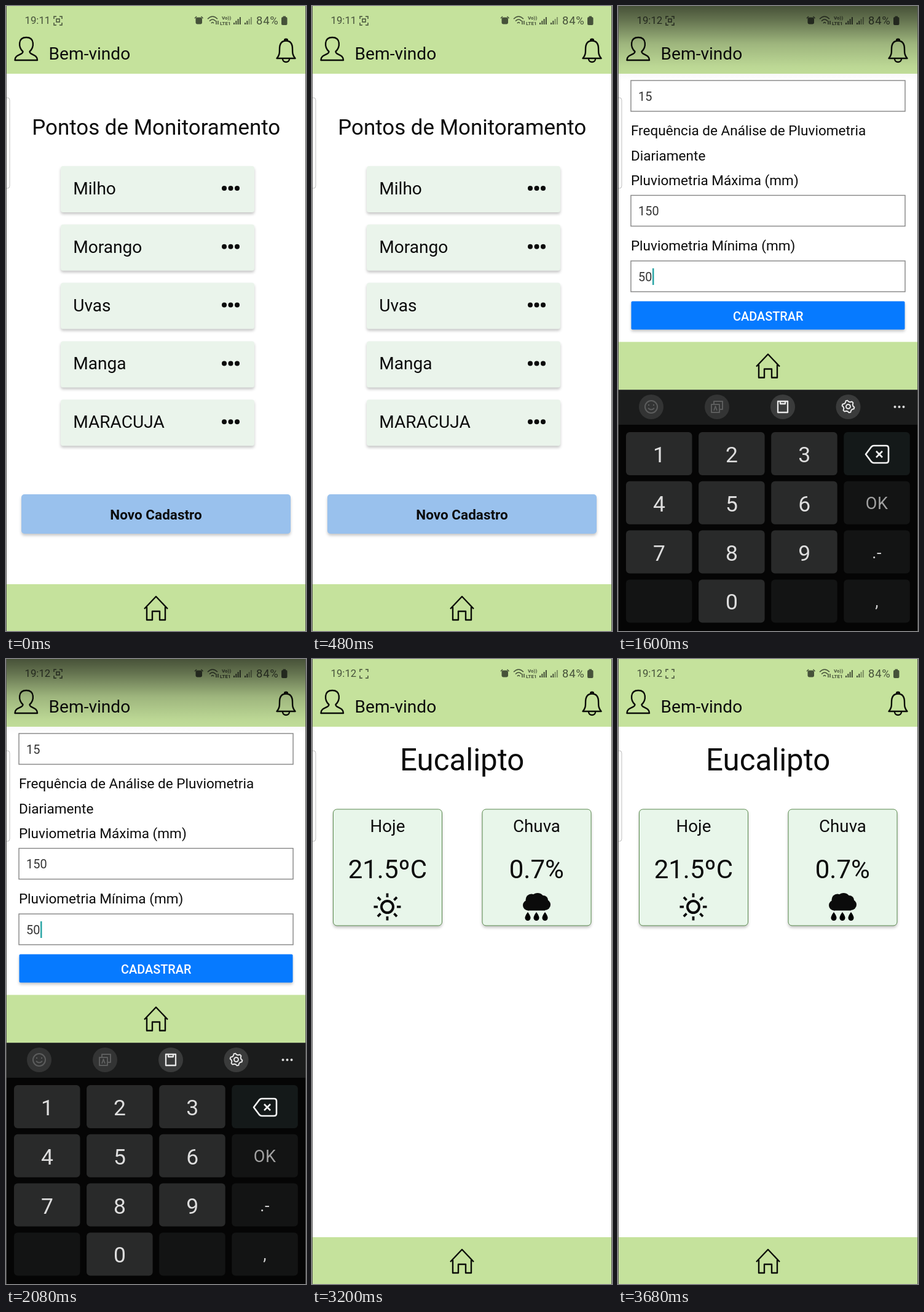
Animation of 488 by 1015 pixels, one loop 4 s. Source, as an HTML page:

```html
<!DOCTYPE html>
<html lang="pt">
<head>
<meta charset="utf-8">
<style>
html, body { margin: 0; width: 100%; height: 100%; overflow: hidden; background: #fff; }
svg { display: block; width: 488px; height: 1015px; font-family: Roboto, sans-serif; }
.card { filter: drop-shadow(0 3px 2px rgba(0,0,0,.22)); }
.dialog { filter: drop-shadow(0 8px 10px rgba(0,0,0,.5)); }
.line { fill: none; stroke: #0b0d08; stroke-width: 2.4; stroke-linejoin: round; }
</style>
</head>
<body>
<svg id="stage" viewBox="0 0 488 1015"></svg>
<script>
const GREEN = '#c5e29c';
const STEP = 800;

const rect = (x, y, w, h, fill, more = '') =>
  `<rect x="${x}" y="${y}" width="${w}" height="${h}" fill="${fill}" ${more}/>`;
const text = (s, x, y, size, fill = '#0c0c0c', more = '') =>
  `<text x="${x}" y="${y}" font-size="${size}" fill="${fill}" ${more}>${s}</text>`;
const mid = (s, x, y, size, fill, more = '') =>
  text(s, x, y, size, fill, 'text-anchor="middle" ' + more);
const path = (d, more = 'class="line"') => `<path d="${d}" ${more}/>`;
const dot = (x, y, r, fill = '#0b0b0b') => `<circle cx="${x}" cy="${y}" r="${r}" fill="${fill}"/>`;
const group = (s, more) => `<g ${more}>${s}</g>`;
const each = (list, f) => list.map(f).join('');

function statusBar(clock, ink, framed) {
  const bars = x => each([0, 1, 2, 3], i =>
    rect(x + i * 3.3, 27 - i * 3, 2, 3 + i * 3, ink, i > 1 && x > 380 ? 'opacity=".55"' : ''));
  const stroke = `fill="none" stroke="${ink}" stroke-width="1.5"`;
  return text(clock, 30.5, 29, 16.8, ink) +
    path('M78 21V17H82M87 17H91V21M91 27V31H87M82 31H78V27', stroke) +
    (framed ? rect(82, 21, 5, 5, 'none', stroke) : '') +
    rect(308.5, 18.5, 10.5, 11, ink, 'rx="3"') +
    path('M307 20l3-3M320.5 20l-3-3', stroke) +
    path('M328 21Q336 13 344 21M331 24.5Q336 19 341 24.5M334 28Q336 25 338 28M342 24v6M345 24v6', stroke) +
    text('Vo))', 351, 22, 8, ink, 'font-weight="700"') +
    text('LTE1', 348, 31, 8, ink, 'font-weight="700"') +
    bars(370) + bars(388) +
    text('84%', 407, 30, 18.4, ink, 'letter-spacing=".8"') +
    rect(448, 18, 9.5, 13, ink, 'rx="2"') + rect(450.5, 16.5, 4.5, 2, ink);
}

const header = () => rect(0, 0, 488, 110, GREEN) +
  path('M27.5 74C20 67 19 51 33 51C47 51 46 67 38.5 74C38.5 80 51 78 51 88H14.5C14.5 78 27.5 80 27.5 74Z') +
  text('Bem-vindo', 69.6, 87, 28.1) +
  path('M440.5 85C445 80 445 76 445 70C445 60 449 56.5 455.5 56.5C462 56.5 466 60 466 70C466 76 466 80 470.5 85Z' +
    'M453 56C453 53 458 53 458 56M450 86a5.5 5 0 0 0 11 0');

const footer = (y = 939, h = 76) => rect(0, y, 488, h, GREEN) +
  group(path('M225 979L244 959L263 979M229 976V997H238V983H250V997H259V976'), `transform="translate(0 ${y - 939})"`);

const handle = (fill, edge) => path('M0 149H3Q6 149 6 153V292Q6 296 3 296H0',
  `fill="${fill}" stroke="${edge}"`);
const edges = () => rect(0, 0, 1, 1015, '#555') + rect(487, 0, 1, 1015, '#555');

function list() {
  const names = ['Milho', 'Morango', 'Uvas', 'Manga', 'MARACUJA'];
  return mid('Pontos de Monitoramento', 244.2, 209, 34.9) +
    each(names, (name, i) => {
      const y = 260 + i * 94.8;
      return rect(89, y, 315, 75, '#eaf4eb', 'rx="4" class="card"') +
        text(name, 109.2, y + 46, 28.1) +
        each([355, 365.5, 376], x => dot(x, y + 36, 4));
    }) +
    rect(25, 793, 438, 64, '#99c1ed', 'rx="5" class="card"') +
    mid('Novo Cadastro', 244, 834, 22.5, '#0c0c0c', 'font-weight="700"');
}

function form(scroll, values) {
  const label = (s, y) => text(s, 20.9, y, 22.55);
  const field = (hint, y, value) => rect(21, y + .5, 446, 50, '#fff', 'stroke="#858585" stroke-width="1.4"') +
    text(value || hint, 33.1, y + 33, 19.9, value ? '#333' : '#757575');
  const [low, rainMax, rainMin] = values;
  return group(
    mid('Cadastro de Monitoramento', 244.3, 167, 33.8) +
    mid('Ponto de Monitoramento', 244.8, 231, 27.8) +
    label('Local', 278) + field('Latitude', 295) + field('Longitude', 360.5) +
    label('Tipo de Cultivo', 450) + field('Tipo de cultivo', 467) +
    mid('Alertas', 244.6, 587.5, 28) +
    label('Frequência de Análise de Temperatura', 644) + label('Diariamente', 684.5) +
    label('Temperatura Máxima', 725) + field('Temperatura máxima', 741) +
    label('Temperatura Mínima', 831) + field('Temperatura mínima', 847.5, low) +
    label('Frequência de Análise de Pluviometria', 937) + label('Diariamente', 977.5) +
    label('Pluviometria Máxima (mm)', 1018) + field('', 1034, rainMax) +
    label('Pluviometria Mínima (mm)', 1124) + field('', 1140.5, rainMin) +
    (rainMin ? rect(56, 1153, 2.5, 27, '#2aa5a5') : '') +
    rect(21.5, 1206.5, 445, 46, '#067aff', 'rx="2" class="card"') +
    mid('CADASTRAR', 244.2, 1237.5, 19.9, '#fff', 'font-weight="500"'),
    `transform="translate(0 ${-scroll})"`);
}

function keyboard() {
  const rows = ['123<', '456K', '789.', ' 0 ,'];
  const signs = { K: 'OK', '.': '.-' };
  const icon = (d, ink, width = 2) =>
    path(d, `fill="none" stroke="${ink}" stroke-width="${width}" stroke-linejoin="round"`);
  const gear = Array.from({ length: 24 }, (_, i) => {
    const a = (i + .5) * Math.PI / 12, r = i % 4 < 2 ? 10 : 7.8;
    return (374.5 + r * Math.cos(a)).toFixed(1) + ' ' + (650.5 + r * Math.sin(a)).toFixed(1);
  }).join('L');
  return rect(0, 623.5, 488, 392, '#050505') + rect(0, 623.5, 488, 56.5, '#1b1c1c') +
    each([54, 161, 268, 374.5], (x, i) => dot(x, 651, 20, i < 2 ? '#333434' : '#3a3b3b')) +
    icon('M44 651a10 10 0 1 0 20 0a10 10 0 1 0 -20 0M49 653q5 5 10 0M50 647v2M58 647v2', '#5c5d5d') +
    icon('M152 647H165V660H152ZM156 647V642H170V655H165M156 657l2.5-7l2.5 7', '#5c5d5d') +
    icon('M260 642H276V660H260ZM264 642V646H272V642', '#e6e6e6', 2.3) +
    icon(`M${gear}ZM371 650.5a3.5 3.5 0 1 0 7 0a3.5 3.5 0 1 0 -7 0`, '#e6e6e6') +
    each([450.5, 457.5, 464.5], x => dot(x, 651, 2, '#ddd')) +
    each(rows, (row, r) => each([...row], (c, i) => {
      const x = 13 + i * 118.1, y = 692 + r * 79.8, digit = c >= '0' && c <= '9';
      const fill = digit ? '#292a2a' : c === '<' ? '#141919' : '#131414';
      const face = c === '<'
        ? icon('M403 728L412 716Q414 714 416 714H436Q440 714 440 718V738Q440 742 436 742H416Q414 742 412 740ZM420 723L430 733M430 723L420 733', '#f4f4f4', 2.6)
        : digit ? mid(c, x + 54, y + 49, 35.5, '#dedede')
        : mid(signs[c] || c, x + 54, y + 45, 27, c === 'K' ? '#a2a2a2' : '#d0d0d0', 'letter-spacing=".8"');
      return rect(x, y, 107.5, 70, fill, 'rx="6"') + face;
    }));
}

const shade = () => `<linearGradient id="shade" x2="0" y2="1"><stop stop-opacity=".64"/>
  <stop offset=".2" stop-opacity=".48"/><stop offset=".5" stop-opacity=".2"/>
  <stop offset=".8" stop-opacity=".05"/><stop offset="1" stop-opacity="0"/></linearGradient>` +
  rect(0, 0, 488, 122, 'url(#shade)');

const entry = rainMin => form(727, ['15', '150', rainMin]) + header() + footer(545.5, 78) + keyboard() + shade();

const dialog = () => rect(0, 0, 488, 1015, '#000', 'opacity=".6"') +
  rect(33, 415, 422, 223, '#fff', 'rx="3" class="dialog"') +
  text('Success', 64, 466.5, 26.9, '#1c1c1c', 'font-weight="500" letter-spacing=".6"') +
  each(['Cadastro submitted for point at', 'Latitude: undefined, Longitude:', 'undefined'],
    (s, i) => text(s, 64, 508.7 + i * 26, 22.45, '#2a2a2a')) +
  text('OK', 385, 610, 18.5, '#3a70a0', 'font-weight="500" letter-spacing="2"');

function weather() {
  const card = (x, title, value) => rect(x, 244, 177, 189, '#e8f6ea', 'rx="6" stroke="#5b8a4e" class="card"') +
    mid(title, x + 88.5, 281, 27.7) + mid(value, x + 88.3, 356, 42);
  const rays = each([0, 1, 2, 3, 4, 5, 6, 7], i =>
    `<path d="M15.5 0H22" transform="translate(122.5 402.5) rotate(${i * 45})" stroke="#0b0b0b" stroke-width="3.8"/>`);
  const drop = x => path(`M${x} 411Q${x + 4.5} 417 ${x + 4.5} 420.5a4.5 4.5 0 0 1 -9 0Q${x - 4.5} 417 ${x} 411Z`, '');
  return mid('Eucalipto', 244.2, 180.5, 49.2) +
    card(34.5, 'Hoje', '21.5ºC') + card(277, 'Chuva', '0.7%') +
    '<circle cx="122.5" cy="402.5" r="9.5" fill="none" stroke="#0b0b0b" stroke-width="4"/>' + rays +
    dot(351.5, 400, 8.5) + dot(379, 399, 9) + dot(357, 391, 9.5) + dot(367, 391, 11) + dot(376, 392, 8) +
    rect(351, 393, 28, 15.5, '#0b0b0b') + each([351, 365, 379], drop);
}

const inkLight = '#46523a', paleHandle = () => handle('#fff', '#bdbdbd');
const scenes = [
  list() + header() + footer() + statusBar('19:11', inkLight, true) + paleHandle(),
  form(0, []) + header() + footer() + statusBar('19:11', inkLight, true) + paleHandle(),
  entry('50') + statusBar('19:12', '#23281e', true) + paleHandle(),
  entry('') + dialog() + statusBar('19:12', '#8c8c8c', false) + handle('#8a8a8a', '#8a8a8a'),
  weather() + header() + footer() + statusBar('19:12', inkLight, false) + paleHandle()
].map(s => s + edges());

const stage = document.getElementById('stage');
const start = performance.now();
let shown = -1;
function draw() {
  const i = Math.floor((performance.now() - start) / STEP) % scenes.length;
  if (i !== shown) stage.innerHTML = scenes[shown = i];
  requestAnimationFrame(draw);
}
draw();
</script>
</body>
</html>
```
